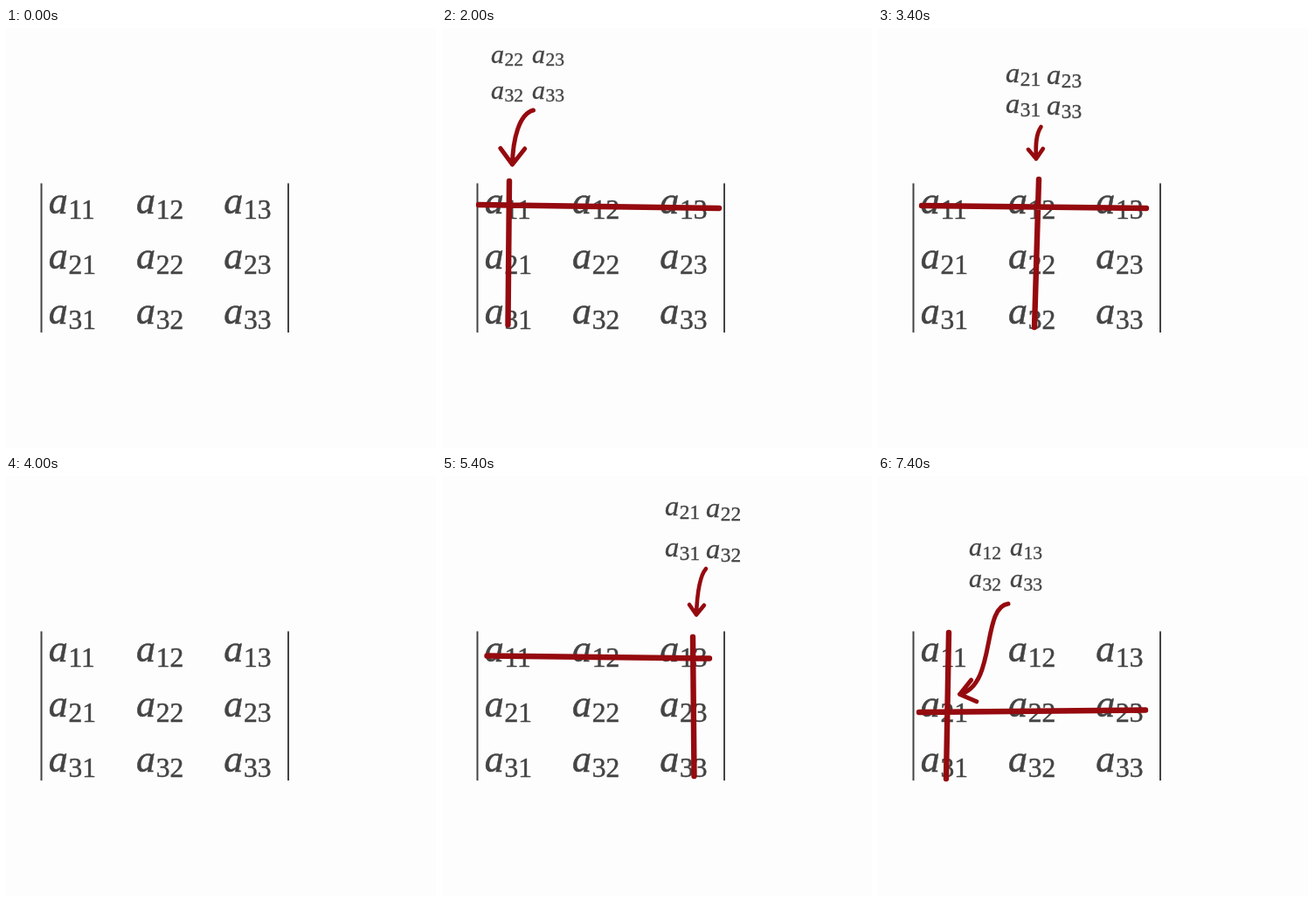
Recreate the animation shown at these times as an HTML page. Size 492 by 480 pixels, loop 8000 ms.

```html
<!DOCTYPE html>
<html lang="en">
<head>
<meta charset="utf-8">
<title>Minors of a determinant</title>
<style>
  html, body { margin: 0; width: 100%; height: 100%; overflow: hidden; background: #fdfdfd; }
  svg { display: block; width: 492px; height: 480px; }
  text { font-family: "Liberation Serif", serif; font-size: 31.5px; fill: #444; stroke: #444; stroke-width: .5; }
  .a { font-size: 44px; font-style: italic; }
  .bar { stroke: #444; stroke-width: 2; }
  .pen { fill: none; stroke: #950a0f; stroke-linecap: round; stroke-linejoin: round; }
</style>
</head>
<body>
<svg id="stage" viewBox="0 0 492 480"></svg>
<script>
const STEP = 2000, FIRST = 400, MINOR_DELAY = 1000, PAUSE = 400;
const stage = document.getElementById('stage');
const indices = [0, 1, 2];

const entry = (row, col, x, y, scale = 1) =>
  `<g transform="translate(${x} ${y}) scale(${scale})">
    <text class="a">a</text><text x="22.7" y="5.6">${row + 1}${col + 1}</text></g>`;

const pen = (d, width) => `<path class="pen" stroke-width="${width}" d="${d}"/>`;

// Entries left over once the struck row and column are gone
function minor({ row, col, x, y, lineHeight, tilt = 0, scale }) {
  const rows = indices.filter(r => r !== row), cols = indices.filter(c => c !== col);
  return rows.map((r, i) => cols.map((c, j) =>
    entry(r, c, x + 47 * j, y + lineHeight * i + tilt * j, scale)).join('')).join('');
}

// Bezier shaft with two barbs turned either way from its end direction
function arrow({ shaft, barb }) {
  const [, , , , bx, by, tipX, tipY] = shaft.match(/[\d.]+/g).map(Number);
  const back = Math.atan2(by - tipY, bx - tipX);
  const end = turn => `${tipX + barb * Math.cos(back + turn)} ${tipY + barb * Math.sin(back + turn)}`;
  return pen(`${shaft}M${end(-.65)}L${tipX} ${tipY}L${end(.65)}`, barb > 20 ? 5 : 4.6);
}

const scenes = [
  { row: 0, col: 0, strikes: 'M42 202L317 206M77 175L75.5 339',
    x: 56, y: 39.5, lineHeight: 41, scale: .685,
    shaft: 'M104.5 94C88 98 81 128 80.5 156', barb: 23 },
  { row: 0, col: 1, strikes: 'M50 203L307 206M184 173L179 342', cleared: PAUSE,
    x: 146, y: 61.5, lineHeight: 35.5, tilt: 2, scale: .74,
    shaft: 'M186.5 113C181 121 180 132 181 149.5', barb: 14 },
  { row: 0, col: 2, strikes: 'M51.5 205.5L306 208.5M287 184L288.5 343',
    x: 255, y: 45, lineHeight: 46.5, tilt: 2, scale: .74,
    shaft: 'M302 106C295 114 292 132 291 158.5', barb: 14 },
  { row: 1, col: 0, strikes: 'M47 270L306 267.5M81 179L78 346',
    x: 104, y: 91, lineHeight: 36, scale: .685,
    shaft: 'M149 146C118 150 136 239 93.5 249.5', barb: 21 }
];

const matrix = indices.map(row => indices.map(col =>
  entry(row, col, 48.7 + 100.3 * col, 212 + 63.2 * row)).join('')).join('');

stage.innerHTML = '<path class="bar" d="M40.5 177.5V348M323 177.5V348"/>' + matrix +
  scenes.map(s => `<g class="strikes">${pen(s.strikes, 6.4)}</g>
    <g class="minor">${minor(s)}${arrow(s)}</g>`).join('');

const strikes = stage.querySelectorAll('.strikes');
const minors = stage.querySelectorAll('.minor');
const show = (node, visible) => node.setAttribute('visibility', visible ? 'visible' : 'hidden');

function draw() {
  const t = performance.now() % (STEP * scenes.length);
  scenes.forEach(({ cleared = 0 }, i) => {
    const age = t - FIRST - STEP * i;
    const active = age >= 0 && age < STEP - cleared;
    show(strikes[i], active);
    show(minors[i], active && age >= MINOR_DELAY);
  });
  requestAnimationFrame(draw);
}
draw();
</script>
</body>
</html>
```
